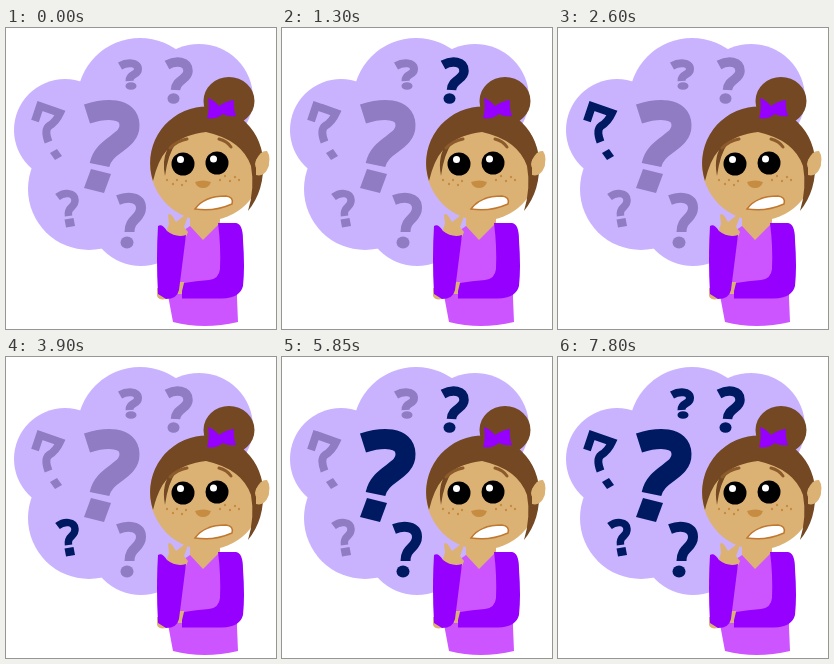
These frames come from a looping animation (270x301 px, 8 s). An HTML page:

```html
<!DOCTYPE html>
<html lang="en">
<head>
<meta charset="utf-8">
<title>Puzzled girl</title>
<style>
  html, body { margin: 0; width: 100%; height: 100%; overflow: hidden; background: #fff; }
  svg { display: block; width: 100%; height: 100%; }
  .mark { color: #8f7cc3; stroke: currentColor; fill: none; }
  .mark.lit { color: #001a62; }
  .dot { fill: currentColor; stroke: none; }
  .skin { fill: #dcb274; }
  .hair { fill: #734822; }
  .sleeve { fill: #9500ff; }
  .line { fill: none; stroke-linecap: round; }
</style>
</head>
<body>
<svg viewBox="0 0 270 301">
  <g fill="#c9b3ff">
    <circle cx="59" cy="102" r="51"/>
    <circle cx="134" cy="73" r="63"/>
    <circle cx="193" cy="70" r="54"/>
    <circle cx="83" cy="161" r="61"/>
    <circle cx="135" cy="185" r="53"/>
    <path d="M60 80H190V195H100Z"/>
  </g>

  <!-- question marks, in lighting order -->
  <g class="mark" stroke-width="20">
    <path d="M81 86C100 80 123 79 123.500 97C124 115 98 116 93.500 137"/>
    <path class="dot" d="M85 141L105 146L98 165L78 160Z"/>
  </g>
  <g class="mark" stroke-width="9.500">
    <path d="M161 37C170 32 182 33 182 43C182 52 170 51 169.500 62"/>
    <ellipse class="dot" cx="167.500" cy="70.500" rx="6" ry="5.300"/>
  </g>
  <g class="mark" stroke-width="10">
    <path d="M112 172C122 168 135 169 135 180C135 191 123.500 190 123.500 204"/>
    <ellipse class="dot" cx="121" cy="214.500" rx="6.500" ry="6"/>
  </g>
  <g class="mark" stroke-width="8">
    <path d="M29 93L34 78L54 85Q50 94 43 98Q38 102 42.500 114"/>
    <path class="dot" d="M44 125L51 121L56 128L49 132Z"/>
  </g>
  <g class="mark" stroke-width="8">
    <path d="M114 38C121 34 132 34 132 41C132 48 123 45 123.500 53"/>
    <ellipse class="dot" cx="125" cy="58" rx="5.500" ry="3.800"/>
  </g>
  <g class="mark" stroke-width="7.500">
    <path d="M51.500 169C58 164 68.500 164 69 172C69.500 180 61 178 62.500 188"/>
    <path class="dot" d="M58.500 191.500L67.500 190L69 198L60 199.500Z"/>
  </g>

  <!-- body -->
  <path class="skin" d="M184 184H214V214H184Z"/>
  <path fill="#cc55ff" d="M174 205L184 198L197 212L213 196L232 215L231 270L232 294Q198 302 167 294L161 262L165 208Z"/>
  <path class="skin" d="M171 254H178V266H171Z"/>
  <path class="sleeve" d="M212 195H230Q237 196 237 212Q239 240 237 258Q234 270 216 270.500H176V263L178 255Q190 253 203 252Q213 251 214 241Q215 218 212 195Z"/>
  <path class="skin" d="M151 260L161 262L160 271Q150 273 151 265Z"/>
  <path class="skin" d="M159 207L163 196L162 187Q164 184 167 189L170 194L179 187Q183 187 181 191L178 199L182 204L178 214H163Z"/>
  <path class="sleeve" d="M152 198Q156 195 161 203Q170 210 180 207L173 262Q171 271 160 271L152 266Q150 230 152 198Z"/>

  <!-- head -->
  <ellipse class="hair" cx="223" cy="73" rx="25.500" ry="24"/>
  <circle class="skin" cx="200.500" cy="136" r="56.500"/>
  <path class="hair" d="M147 153A56.500 56.500 0 1 1 257 132Q259 162 242 183Q249 160 245 138Q236 112 200 104Q178 107 170 115Q162 126 159 148Q156 133 161 122Q152 132 147 153Z"/>
  <circle class="skin" cx="256" cy="136" r="7"/>
  <path class="skin" d="M250 132Q255 122 261 123Q266 130 261 142Q257 149 250 147Z"/>
  <path class="sleeve" d="M202 70Q208 72 213 78Q220 73 228 72Q227 80 230 88Q222 89 217 86Q209 92 201 90Q204 80 202 70Z"/>
  <path class="line" stroke="#8c5a2b" stroke-width="3" d="M164 120Q171 113 181 111M213 111Q221 113 225 119"/>
  <circle cx="177" cy="136" r="11.500"/>
  <circle cx="211" cy="135" r="11.500"/>
  <circle cx="174.500" cy="131.500" r="3.500" fill="#fff"/>
  <circle cx="207.500" cy="131" r="3.500" fill="#fff"/>
  <path fill="#c68c42" d="M189 154Q197 151 205 154Q203 160 197 160Q191 160 189 154Z"/>
  <path class="line" stroke="#c68c42" stroke-width="2.400" d="M161 152h0M167 156h0M171 152h0M176 157h0M180 153h0M214 152h0M219 148h0M224 153h0M229 149h0M233 152h0"/>
  <path d="M189 181Q198 168 220 168Q228 169 226 176Q208 184 189 181Z" fill="#fff" stroke="#c07830" stroke-width="1.500"/>
</svg>
<script>
  const STEP = 650, LOOP = 8000;
  const marks = document.querySelectorAll('.mark');

  // First one mark at a time, then they stay lit one after another.
  function draw(now) {
    const step = Math.floor(now % LOOP / STEP);
    marks.forEach((mark, i) => {
      const lit = step < 7 ? i === step - 1 : i <= step - 7;
      mark.classList.toggle('lit', lit);
    });
  }

  let start;
  function tick(now) {
    start ??= now;
    draw(now - start);
    requestAnimationFrame(tick);
  }
  draw(0);
  requestAnimationFrame(tick);
</script>
</body>
</html>
```
